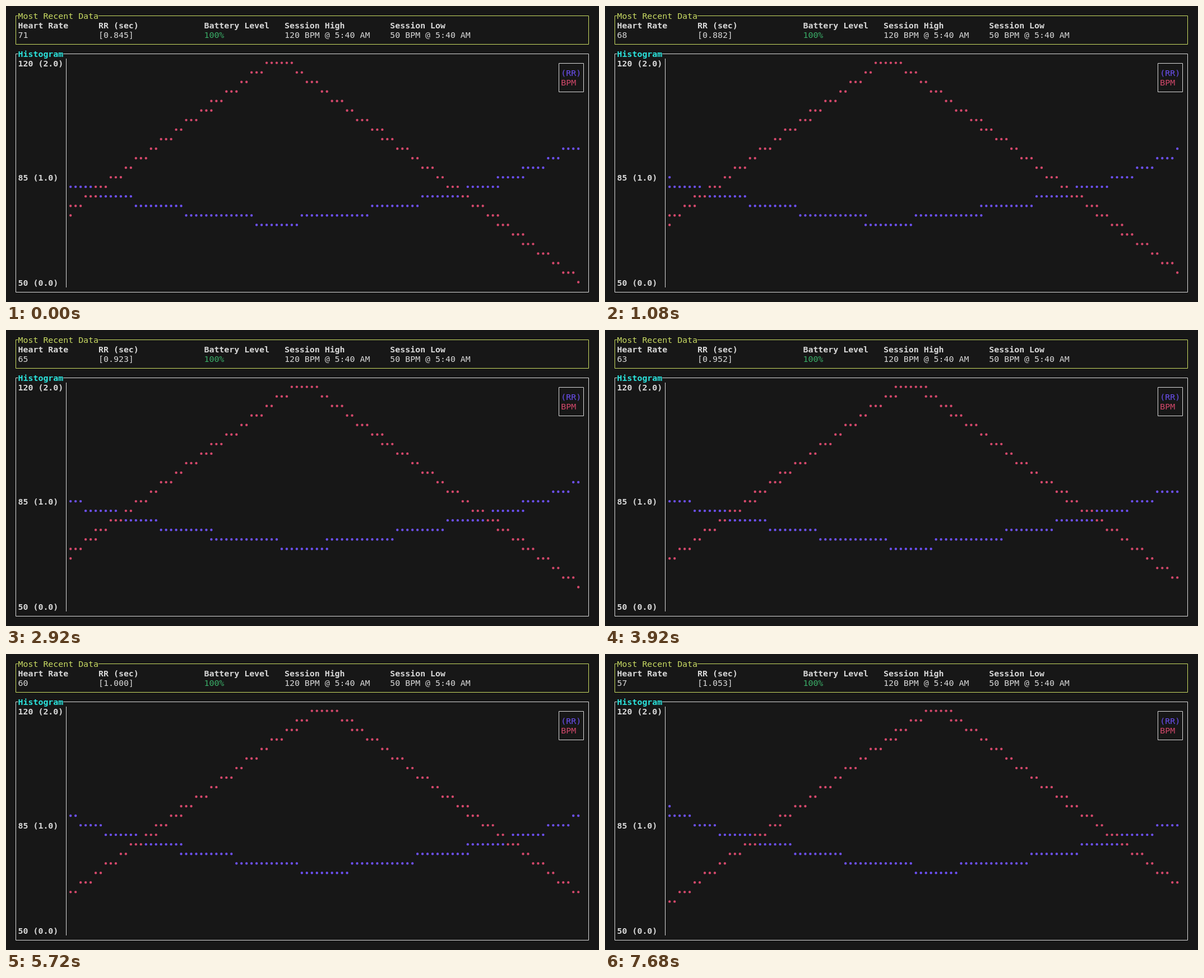
An HTML page that plays this animation: 1058x529 px, repeating every 8000 ms.

```html
<!DOCTYPE html>
<html lang="en">
<head>
<meta charset="utf-8">
<title>Heart rate monitor</title>
<style>
  html, body { margin: 0; width: 100%; height: 100%; overflow: hidden; background: #171717; }
  svg { display: block; width: 1058px; height: 529px; }
  text { font: 14.9px "DejaVu Sans Mono", monospace; white-space: pre; }
  .bold { font-weight: bold; }
  .line { fill: none; stroke-width: 1; }
</style>
</head>
<body>
<svg id="stage" viewBox="0 0 1058 529" xmlns="http://www.w3.org/2000/svg"></svg>
<script>
const NS = "http://www.w3.org/2000/svg";
const CELL_W = 8.97, CELL_H = 17.04, LEFT = 12.6, BASELINE = 22.5;
const COLS = 102, ROWS = 23, SAMPLES = 120;
const LOW = 50, HIGH = 120, RR_MAX = 2;
const LOOP = 8000, START_BPM = 71;
const BEATS = [80, 400, 1080, 1680, 2320, 2920, 3480, 3920, 4600, 5200, 5720, 6400, 7000, 7680];
const C = {
  text: "#d9d9d9", lime: "#c9db63", cyan: "#2be5de",
  green: "#3aae68", rr: "#6c50f2", bpm: "#d3486b"
};
const stage = document.getElementById("stage");

function add(tag, attrs) {
  const el = document.createElementNS(NS, tag);
  for (const key in attrs) el.setAttribute(key, attrs[key]);
  return stage.appendChild(el);
}

// Text placed on the terminal's character grid
function label(col, row, text, fill = C.text, bold = false) {
  const el = add("text", {
    x: LEFT + col * CELL_W, y: BASELINE + row * CELL_H,
    fill, class: bold ? "bold" : ""
  });
  el.textContent = text;
  return el;
}

function line(d, stroke = C.text) {
  return add("path", { d, stroke, class: "line" });
}

// Frame whose top edge leaves room for a title
function panel(top, bottom, gapEnd, color) {
  line(`M21.6 ${top}H17.5V${bottom}H1039.5V${top}H${gapEnd}`, color);
}

panel(17.5, 68.5, 165, C.lime);
label(1, 0, "Most Recent Data", C.lime);
[[1, "Heart Rate"], [17, "RR (sec)"], [38, "Battery Level"], [54, "Session High"], [75, "Session Low"]]
  .forEach(([col, text]) => label(col, 1, text, C.text, true));
const rateText = label(1, 2, "");
const rrText = label(17, 2, "");
label(38, 2, "100%", C.green);
label(54, 2, "120 BPM @ 5:40 AM");
label(75, 2, "50 BPM @ 5:40 AM");

panel(85.5, 511.5, 102.3, C.text);
label(1, 4, "Histogram", C.cyan, true);
label(1, 5, "120 (2.0)", C.text, true);
label(1, 17, "85 (1.0)", C.text, true);
label(1, 28, "50 (0.0)", C.text, true);
line("M107.5 94V503");

const rrDots = add("path", { fill: C.rr });
const bpmDots = add("path", { fill: C.bpm });

line("M986.5 102.5H1030.5V153.5H986.5Z");
label(109, 6, "(RR)", C.rr);
label(109, 7, "BPM", C.bpm);

function dot(col, row) {
  const x = 115.2 + col * CELL_W, y = 101.6 + row * CELL_H, r = 2.2;
  return `M${(x - r).toFixed(2)} ${y.toFixed(2)}a${r} ${r} 0 1 0 ${2 * r} 0a${r} ${r} 0 1 0 ${-2 * r} 0`;
}

const bpmRow = bpm => Math.floor(ROWS * (HIGH - bpm) / (HIGH - LOW));
const rrRow = bpm => Math.floor(ROWS - ROWS * 60 / (RR_MAX * bpm));

let shown = 0;

function draw(time) {
  const now = time % LOOP;
  const rate = START_BPM - BEATS.filter(beat => now >= beat).length;
  if (rate === shown) return;
  shown = rate;
  rateText.textContent = rate;
  rrText.textContent = `[${(60 / rate).toFixed(3)}]`;

  // Newest sample on the left; taken cells are drawn once, with BPM on top
  const bpmCells = new Set(), rrCells = new Set();
  for (let i = 0; i < SAMPLES; i++) {
    const bpm = HIGH - Math.abs(HIGH - rate - i);
    const col = Math.floor(i * COLS / SAMPLES);
    bpmCells.add(bpmRow(bpm) * COLS + col);
    rrCells.add(rrRow(bpm) * COLS + col);
  }
  const path = cells => cells.map(n => dot(n % COLS, Math.floor(n / COLS))).join("");
  bpmDots.setAttribute("d", path([...bpmCells]));
  rrDots.setAttribute("d", path([...rrCells].filter(n => !bpmCells.has(n))));
}

const start = performance.now();
function tick() {
  draw(performance.now() - start);
  requestAnimationFrame(tick);
}
tick();
</script>
</body>
</html>
```
